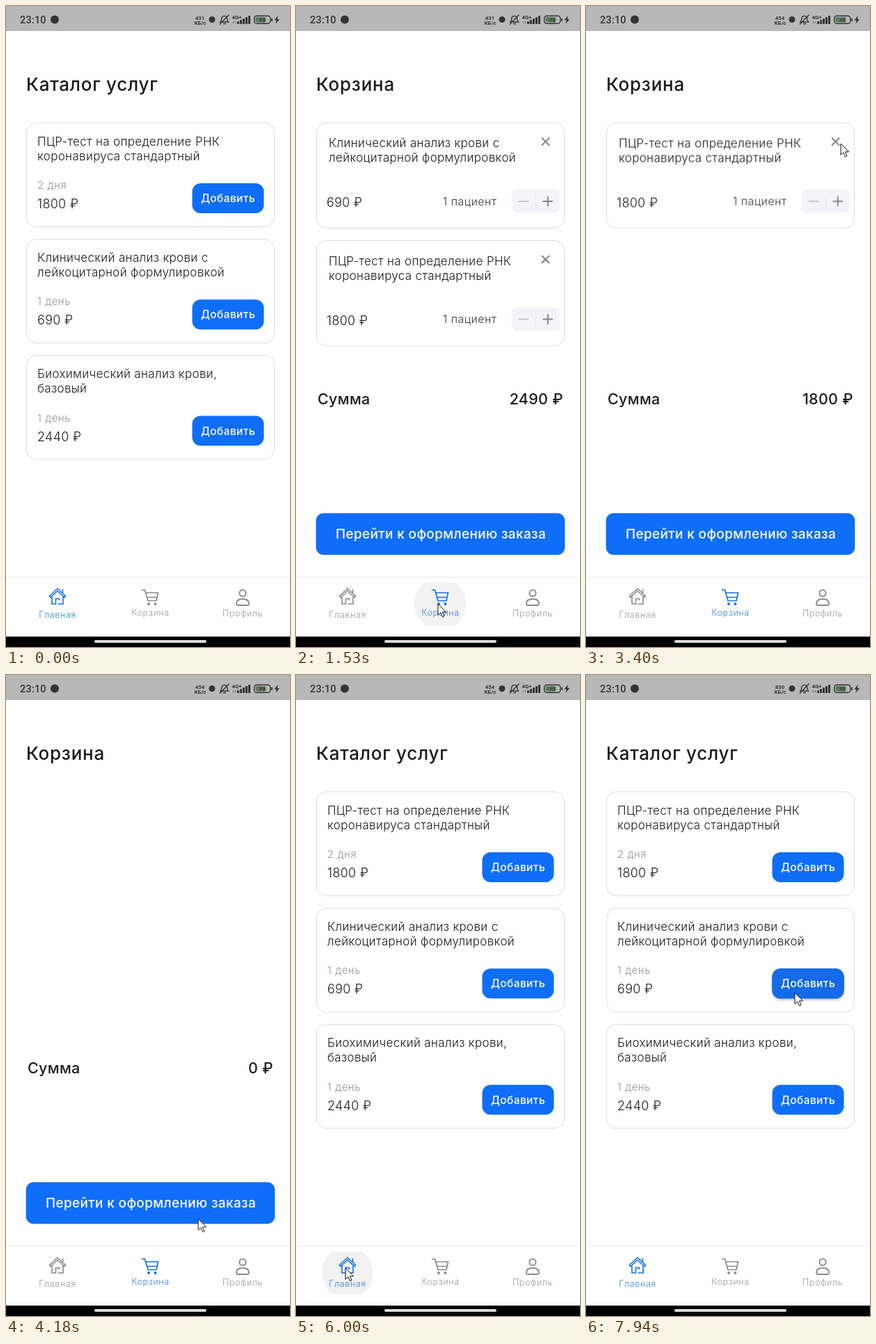
An HTML page that plays this animation: 408 px wide and 922 px high, repeating every 8000 ms.

```html
<!DOCTYPE html>
<html lang="ru">
<head>
<meta charset="utf-8">
<title>Каталог услуг</title>
<style>
html, body { margin: 0; width: 100%; height: 100%; overflow: hidden; background: #fff; }
svg { display: block; width: 100%; height: 100%; font-family: Inter, "Noto Sans", sans-serif; font-weight: 350; fill: #1c1c1e; }
.title { font-size: 26px; font-weight: 450; letter-spacing: .75px; }
.name { font-size: 17px; letter-spacing: .32px; }
.term { font-size: 15px; letter-spacing: .55px; fill: #969696; }
.price { font-size: 18px; letter-spacing: .3px; }
.add { font-size: 15.5px; font-weight: 450; letter-spacing: .4px; fill: #fff; text-anchor: middle; }
.count { font-size: 16px; letter-spacing: .45px; fill: #3a3a3c; font-weight: 300; }
.sum { font-size: 21.5px; font-weight: 450; letter-spacing: .3px; }
.order { font-size: 19px; font-weight: 450; letter-spacing: .35px; fill: #fff; text-anchor: middle; }
.contact { font-size: 16px; font-weight: 450; letter-spacing: .35px; fill: #929292; }
.menu { font-size: 18.5px; letter-spacing: .4px; }
.link { font-size: 16px; letter-spacing: .65px; fill: #959595; text-anchor: middle; }
.tab { font-size: 12.5px; font-weight: 300; letter-spacing: .65px; fill: currentColor; fill-opacity: .85; text-anchor: middle; }
.end { text-anchor: end; }
.card { fill: #fff; stroke: #dcdcde; }
.blue { fill: #0f6ef7; }
.line { fill: none; stroke: currentColor; stroke-width: 1.9; }
.status { font-family: Roboto, sans-serif; font-weight: 400; fill: #333; }
.tiny { font-size: 7.8px; font-weight: 700; text-anchor: middle; }

/* one loop is 8 s, so 1% is 80 ms */
.catalog, .cart, .profile, .first, .second, .step, .tabs g { animation: 8s step-end infinite; }
.catalog { animation-name: catalog; }
.cart { animation-name: cart; }
.profile { animation-name: profile; }
.first { animation-name: first; }
.second { animation-name: second; }
.sum-a { animation-name: first; }
.sum-b { animation-name: sum-b; }
.sum-c { animation-name: sum-c; }
.net-a { animation-name: net-a; }
.net-b { animation-name: net-b; }
.net-c { animation-name: net-c; }
.tabs .t-home { animation-name: t-home; }
.tabs .t-cart { animation-name: t-cart; }
.tabs .t-user { animation-name: t-user; }
@keyframes catalog { 0% { opacity: 1 } 19.125% { opacity: 0 } 75%, 100% { opacity: 1 } }
@keyframes cart { 0% { opacity: 0 } 19.125% { opacity: 1 } 64.125%, 100% { opacity: 0 } }
@keyframes profile { 0% { opacity: 0 } 64.125% { opacity: 1 } 75%, 100% { opacity: 0 } }
@keyframes first { 0% { opacity: 1 } 40%, 100% { opacity: 0 } }
@keyframes second {
  0% { opacity: 1; transform: translateY(169.5px) }
  40% { opacity: 1; transform: none }
  52.25%, 100% { opacity: 0; transform: none }
}
@keyframes sum-b { 0% { opacity: 0 } 40% { opacity: 1 } 52.25%, 100% { opacity: 0 } }
@keyframes sum-c { 0% { opacity: 0 } 52.25%, 100% { opacity: 1 } }
@keyframes net-a { 0% { opacity: 1 } 35.75%, 100% { opacity: 0 } }
@keyframes net-b { 0% { opacity: 0 } 35.75% { opacity: 1 } 80%, 100% { opacity: 0 } }
@keyframes net-c { 0% { opacity: 0 } 80%, 100% { opacity: 1 } }
@keyframes t-home { 0% { color: #1470ea } 19.125% { color: #8a8a8a } 75%, 100% { color: #1470ea } }
@keyframes t-cart { 0% { color: #8a8a8a } 19.125% { color: #1470ea } 64.125%, 100% { color: #8a8a8a } }
@keyframes t-user { 0% { color: #8a8a8a } 64.125% { color: #3f7cc8 } 75%, 100% { color: #8a8a8a } }

.ripple { fill: #f2f2f2; transform-box: fill-box; transform-origin: center;
  animation: ripple 8s linear infinite; animation-delay: calc(var(--t) - 8s); }
@keyframes ripple {
  0% { transform: scale(.2); opacity: 0 }
  2.3% { transform: none; opacity: 1 }
  4.2% { transform: none; opacity: 1 }
  7%, 100% { transform: none; opacity: 0 }
}
.press { fill: #146ae8; opacity: 0; filter: drop-shadow(0 2px 2px #0004); }
.press0 { animation: press0 8s linear infinite; }
.press1 { animation: press1 8s linear infinite; }
@keyframes press0 { 0%, 86.5% { opacity: 0 } 88%, 95.5% { opacity: 1 } 97%, 100% { opacity: 0 } }
@keyframes press1 { 0%, 96% { opacity: 0 } 98%, 100% { opacity: 1 } }

.cursor { animation: cursor 8s ease-in-out infinite; }
@keyframes cursor {
  0%, 7.5% { transform: translate(306px, 924px) }
  12.25%, 13.2% { transform: translate(199px, 862px) }
  14.5% { transform: translate(194px, 851px) }
  15.625%, 22.5% { transform: translate(204px, 860px) }
  33.125%, 48.25% { transform: translate(366px, 198px); animation-timing-function: ease-in }
  52.25% { transform: translate(276px, 782px); animation-timing-function: ease-out }
  57.375%, 60% { transform: translate(334px, 858px); animation-timing-function: ease-in }
  64.125% { transform: translate(272px, 863px); animation-timing-function: linear }
  66.5% { transform: translate(70px, 873px); animation-timing-function: ease-out }
  67.5% { transform: translate(22px, 866px) }
  69.125%, 69.6% { transform: translate(62px, 848px) }
  71.625%, 78% { transform: translate(71px, 853px) }
  85%, 91.5% { transform: translate(306px, 277px) }
  95.125%, 95.6% { transform: translate(303px, 442px) }
  99.25%, 100% { transform: translate(300px, 457px) }
}
</style>
</head>
<body>
<svg id="stage" viewBox="0 0 408 922"></svg>
<script>
const text = (cls, x, y, s) => `<text class="${cls}" x="${x}" y="${y}">${s}</text>`;
const rect = (x, y, w, h, r, attrs) =>
  `<rect x="${x}" y="${y}" width="${w}" height="${h}" rx="${r}" ${attrs}/>`;
const group = (cls, ...parts) => `<g class="${cls}">${parts.join('')}</g>`;
const shift = (y, s) => `<g transform="translate(0 ${y})">${s}</g>`;
const path = (d, attrs) => `<path d="${d}" ${attrs}/>`;

const pcr = ['ПЦР-тест на определение РНК', 'коронавируса стандартный'];
const blood = ['Клинический анализ крови с', 'лейкоцитарной формулировкой'];
const chem = ['Биохимический анализ крови,', 'базовый'];

const service = ([a, b], term, price, i) => shift(168 + i * 167.3, [
  rect(29.5, 0, 356, 149.5, 14, 'class="card"'),
  text('name', 45, 32.5, a), text('name', 45, 53.5, b),
  text('term', 45, 95, term), text('price', 45, 123, price + ' ₽'),
  rect(267.5, 87, 103, 43, 12, 'class="blue"'),
  i < 2 ? rect(267.5, 87, 103, 43, 12, `class="press press${i}"`) : '',
  text('add', 319, 114, 'Добавить')
].join(''));

const item = ([a, b], price) => shift(168, [
  rect(29.5, 0, 356, 151.5, 14, 'class="card"'),
  text('name', 47, 35, a), text('name', 47, 56, b),
  text('price', 44, 121, price + ' ₽'), text('count', 211, 118.5, '1 пациент'),
  path('M353 21.5l11 11m0-11l-11 11', 'class="line" color="#838386"'),
  rect(310, 96, 69, 33.5, 8, 'fill="#f4f3f8"'),
  path('M319.5 113h15', 'class="line" color="#c3c3ca"'),
  path('M344.5 104v18', 'stroke="#e6e6ec"'),
  path('M354.5 113h14.5m-7.25-7.25v14.5', 'class="line" color="#858589"')
].join(''));

const sum = (cls, s) => text('sum end step ' + cls, 384, 573, s + ' ₽');

const clipboard = rect(30.5, 271, 30, 31.5, 3, 'fill="#b98360"')
  + rect(33, 273, 25, 26.5, 1, 'fill="#dfe2e5"')
  + path('M37 281h17m-17 4h17m-17 4h17m-17 4h12', 'stroke="#c3c7cb"')
  + path('M37 276v-3q0-2 3-2h3q2.5-4 5 0h3q3 0 3 2v3z', 'fill="#8f9499"');
const folder = path('M30 345q0-4 3-4h26q2 0 2 3v20H30z', 'fill="#d29a5c"')
  + rect(33, 340, 8, 8, 1, 'fill="#e0905c"') + rect(41, 341, 9, 8, 1, 'fill="#6d94bd"')
  + rect(50, 340, 9, 8, 1, 'fill="#d77f58"')
  + path('M29.5 347h9l3 3h8l3-3h9v19q0 3-3 3h-26q-3 0-3-3z', 'fill="#e6b67a"');
const house = rect(50, 406, 5, 12, 0, 'fill="#94503f"')
  + path('M32 420 42 409 60 421V437H32z', 'fill="#e5cfae"')
  + path('M28 421 38 405H49L62 421 58 424 44 411 32 425z', 'fill="#5d3c30"')
  + rect(47, 424, 7, 13, 0, 'fill="#75412d"')
  + rect(35, 423, 8, 8, 0, 'fill="#6b8fa8" stroke="#fff"')
  + path('M29 438q2-7 7-4 4-2 8 4zM54 438q2-6 8 0z', 'fill="#566b3c"');
const gear = '<g fill="none" stroke="#83888c">'
  + '<circle cx="45" cy="489" r="14.500" stroke-width="5" stroke-dasharray="3.8 3.79"/>'
  + '<circle cx="45" cy="489" r="10.500" stroke="#8c9195" stroke-width="6"/>'
  + '<circle cx="45" cy="489" r="6.500" stroke="#62676b" stroke-width="3"/></g>'
  + '<circle cx="45" cy="489" r="4.500" fill="#b4b8bb"/>';

const menu = ['Мои заказы', 'Медицинские карты', 'Мои адреса', 'Настройки'];
const links = ['Ответы на вопросы', 'Политика конфиденциальности', 'Пользовательское соглашение'];

const tab = (cls, x, y, label, icon) =>
  group(cls, `<g class="line">${icon}</g>`, text('tab', x, y, label));
const ripple = (x, t) =>
  `<circle class="ripple" cx="${x}" cy="860" r="37" style="--t:${t}s"/>`;
const net = (cls, s) => text('tiny step ' + cls, 278.5, 20, s);
const bars = [0, 1, 2, 3, 4].map(i =>
  rect(332 + i * 4, 22 - i * 2, 3, 4 + i * 2, .8, '')).join('');

const status = rect(0, 0, 408, 36, 0, 'fill="#b8b8b8"') + group('status',
  '<text x="20" y="25" font-size="14.5" font-weight="500" letter-spacing=".2">23:10</text>',
  '<circle cx="70" cy="19.5" r="6"/>',
  net('net-a', '431'), net('net-b', '454'), net('net-c', '830'),
  text('tiny', 279, 27, 'КБ/с'),
  '<circle cx="296" cy="19.5" r="4.5"/>',
  path('M308 23h11.5c-2-2-1.5-4-2-6a4 4 0 0 0-7.5 0c-.5 2 0 4-2 6zM307 26.5 320.5 12.5M312 25.5h4',
    'fill="none" stroke="#333" stroke-width="1.4"'),
  text('tiny', 331.5, 18.5, '4G+'),
  path('M326.5 25v-3m3 0v3', 'stroke="#777" stroke-width="1.2"'),
  bars,
  rect(356.7, 14.2, 23, 11, 3.5, 'fill="none" stroke="#333" stroke-width="1.4"'),
  rect(358.5, 16, 15, 7.4, 1.8, 'fill="#5d7a5f"'),
  rect(381, 17.5, 1.8, 4.5, .8, ''),
  text('tiny', 368, 22.5, '73'),
  path('M390.5 14l-5 6.5h3l-1 5 5.5-6.5h-3z', ''));

document.getElementById('stage').innerHTML = [
  '<clipPath id="bar"><rect y="829.5" width="408" height="61"/></clipPath>',
  group('catalog',
    text('title', 29, 122, 'Каталог услуг'),
    service(pcr, '2 дня', 1800, 0),
    service(blood, '1 день', 690, 1),
    service(chem, '1 день', 2440, 2)),
  group('cart',
    text('title', 29, 122, 'Корзина'),
    group('first', item(blood, 690)),
    group('second', item(pcr, 1800)),
    text('sum', 31, 573, 'Сумма'),
    sum('sum-a', 2490), sum('sum-b', 1800), sum('sum-c', 0),
    rect(28.7, 729.5, 357.6, 60, 11, 'class="blue"'),
    text('order', 208, 766, 'Перейти к оформлению заказа')),
  group('profile',
    text('title', 29, 122, 'Даниил'),
    text('contact', 29, 164, '+7 000 123-45-67'),
    text('contact', 29, 198, 'box@example.com'),
    clipboard, folder, house, gear,
    ...menu.map((s, i) => text('menu', 84, 292 + i * 67.8, s)),
    ...links.map((s, i) => text('link', 207.5, 602 + i * 51, s)),
    '<text class="link" x="208" y="755" style="fill:#cb7a4c">Выход</text>'),
  status,
  path('M0 821.5H408', 'stroke="#ebebeb"'),
  `<g clip-path="url(#bar)">${ripple(207, 1.33)}${ripple(340, 4.93)}${ripple(74, 5.8)}</g>`,
  group('tabs',
    tab('t-home', 74, 880, 'Главная',
      path('M62.5 848.5 74 838 85.5 848.5 84 850.5 74 841.5 64 850.5zM66 850V860H71.5V852.5H76.5V855M82 850V860H74.5M81.5 839V844', 'stroke-width="1.6"')),
    tab('t-cart', 207.5, 877, 'Корзина',
      path('M195 840h4.5l4.5 15.5h12l2.5-11.5H201M203 850.5h14', 'stroke-width="1.7"')
      + '<circle cx="205" cy="860" r="1"/><circle cx="214.5" cy="860" r="1"/>'),
    tab('t-user', 340, 878, 'Профиль',
      '<circle cx="340" cy="844.5" r="4.6"/>'
      + path('M331 859.5q0-6.5 9-6.5t9 6.5q0 2.5-2.5 2.5h-13q-2.5 0-2.5-2.5z', ''))),
  rect(0, 907, 408, 15, 0, 'fill="#000"'),
  rect(127, 912, 161, 4, 2, 'fill="#dadada"'),
  group('cursor', path('M0 0V16.2L3.8 12.7 6.5 18.8 9 17.7 6.4 11.8H11.5Z',
    'fill="#fff" stroke="#111" stroke-linejoin="round"'))
].join('');
</script>
</body>
</html>
```
